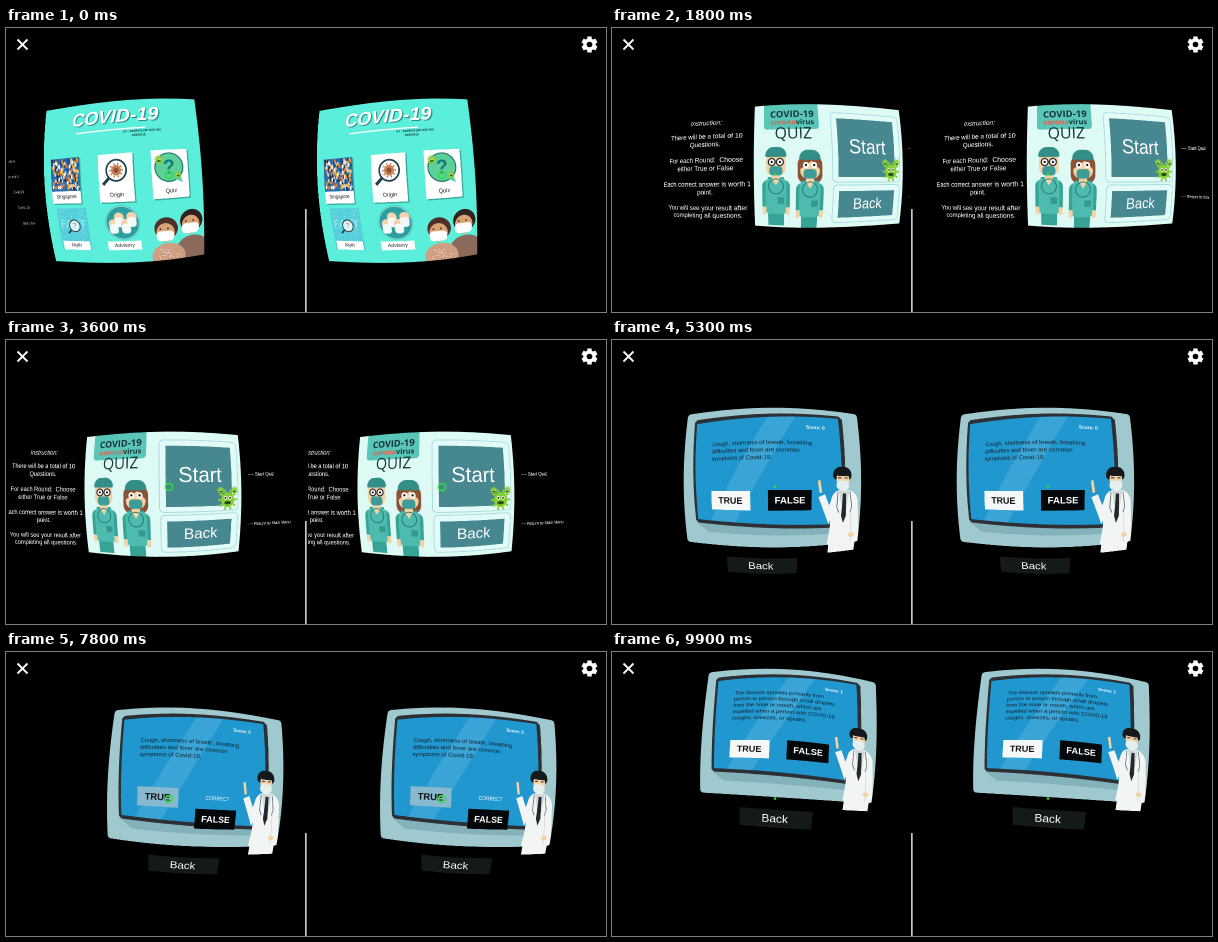
An HTML page with a canvas that plays this animation: 600x284 px, repeating every 10000 ms.

```html
<!DOCTYPE html>
<html lang="en">
<head>
<meta charset="utf-8">
<title>VR quiz</title>
<style>
html, body { margin: 0; width: 100%; height: 100%; overflow: hidden; background: #000; }
canvas { display: block; width: 600px; height: 284px; }
</style>
</head>
<body>
<canvas id="stage" width="600" height="284"></canvas>
<script>
const LOOP = 10000, STEP = 100;
const EYE = 273, CX = 163, CY = 147; // distance of the two views, gaze point
const FOCAL = 260, BARREL = 1.75e-5;
const TEX = 3, RES = 2, CELL = 10, LAP = .8;
const SANS = '"Liberation Sans", Arial, sans-serif';
const HUMAN = '"Open Sans", "Liberation Sans", sans-serif';
const INK = '#15353a', TEAL = '#4dbbae', SKIN = '#f3d2a6', GREEN = '#2ee23a';
const stage = document.getElementById('stage').getContext('2d');
const eye = newCanvas(330 * RES, 284 * RES);
let g; // context currently drawn on

function newCanvas(w, h) {
  const c = document.createElement('canvas');
  c.width = w;
  c.height = h;
  return c.getContext('2d');
}
let seed = 7;
const rand = n => (seed = seed * 16807 % 2147483647) / 2147483647 * n;

// Drawing helpers
function box(x, y, w, h, color, r = 0) {
  g.fillStyle = color;
  g.beginPath();
  g.roundRect(x, y, w, h, r);
  g.fill();
}
function oval(x, y, rx, ry, color) {
  g.fillStyle = color;
  g.beginPath();
  g.ellipse(x, y, rx, ry, 0, 0, 7);
  g.fill();
}
function dot(x, y, r, color) { oval(x, y, r, r, color); }
function ring(x, y, r, color, width) {
  g.strokeStyle = color;
  g.lineWidth = width;
  g.beginPath();
  g.arc(x, y, r, 0, 7);
  g.stroke();
}
function trace(points) {
  g.beginPath();
  for (let i = 0; i < points.length; i += 2) g.lineTo(points[i], points[i + 1]);
}
function poly(color, ...points) {
  trace(points);
  g.fillStyle = color;
  g.fill();
}
function line(color, width, ...points) {
  trace(points);
  g.strokeStyle = color;
  g.lineWidth = width;
  g.stroke();
}
function text(s, x, y, size, color = '#fff', align = 'center', style = '', family = SANS) {
  g.font = `${style} ${size}px ${family}`;
  g.textAlign = align;
  g.textBaseline = 'middle';
  g.fillStyle = color;
  g.fillText(s, x, y);
}
function placed(x, y, scale, draw) {
  g.save();
  g.translate(x, y);
  g.scale(scale, scale);
  draw();
  g.restore();
}
function virus(x, y, r, color) {
  for (let i = 0; i < 10; i++) {
    const a = i * Math.PI / 5, c = Math.cos(a) * r * 1.25, s = Math.sin(a) * r * 1.25;
    line(color, r * .16, x, y, x + c, y + s);
    dot(x + c, y + s, r * .17, color);
  }
  dot(x, y, r, color);
}
function germ(x, y, r) {
  virus(x, y, r, '#86cf32');
  for (const side of [-.35, .35]) {
    dot(x + side * r, y - r * .25, r * .25, '#fff');
    dot(x + side * r, y - r * .25, r * .13, '#222');
  }
  oval(x, y + r * .4, r * .5, r * .22, '#244d18');
}

// A flat picture, w by h, facing the viewer at some yaw; area may reach beyond it
function panel(w, h, area, draw, { yaw = 0, unit = 1 } = {}) {
  const [x0, y0, x1, y1] = area;
  g = newCanvas((x1 - x0) * TEX, (y1 - y0) * TEX);
  g.scale(TEX, TEX);
  g.translate(-x0, -y0);
  draw();
  return { w, h, area, yaw, unit, image: g.canvas };
}

function card(x, y, label) {
  box(x + 1.5, y + 1.5, 42, 55, '#35a99d');
  box(x, y, 42, 55, '#fff');
  text(label, x + 21, y + 47, 6.5, '#222');
}
function strip(x, y, w, label) {
  box(x - w / 2, y - 6, w, 12, '#fff');
  text(label, x, y, 6.5, '#222');
}
function lens(x, y, r, fill) {
  line('#23404d', r * .3, x, y, x - r * 1.4, y + r * 1.3);
  dot(x, y, r, fill);
  ring(x, y, r, '#23404d', r * .17);
}
function maskedHead(x, y, hair, coat) {
  oval(x + 1, y + 35, 21, 19, coat);
  dot(x, y - 3, 14, hair);
  oval(x - 1, y + 2, 11, 12, '#d9a377');
  box(x - 12, y, 21, 13, '#fff', 5);
  dot(x - 7, y - 3, 1, '#222');
  dot(x + 2, y - 3, 1, '#222');
}

const menu = panel(200, 200, [-110, 0, 200, 200], () => {
  box(0, 0, 200, 200, '#5beeda');
  text('COVID-19', 98.5, 23.5, 24, '#2f8f89', 'center', 'italic bold');
  text('COVID-19', 97, 22, 24, '#fff', 'center', 'italic bold');
  line('#fff', 1.6, 48, 38, 136, 38);
  text('BY : DARREN LIM SOO HUI', 132, 42, 3.4, '#163c3a', 'center', 'bold');
  text('P2930415', 128, 47, 3.6, '#163c3a', 'center', 'bold');

  card(11, 67, 'Singapore');
  box(11, 67, 42, 40, '#2c6fae');
  const crowd = ['#f2b233', '#fff', '#164b86', '#e8793a', '#f3c9a5', '#222f45'];
  for (let i = 0; i < 170; i++) {
    oval(13 + rand(38), 69 + rand(36), 1.3, 2.4, crowd[i % crowd.length]);
  }
  card(78, 67, 'Origin');
  lens(100, 86, 12, '#fff');
  virus(100, 86, 6, '#c98254');
  dot(100, 86, 3, '#8f4c36');
  card(141, 66, 'Quiz');
  dot(161, 86, 16, '#5ccf9b');
  ring(161, 86, 16, '#247c70', 1.4);
  poly('#5ccf9b', 166, 99, 176, 104, 173, 94);
  text('?', 161, 87, 22, '#147d78', 'center', 'bold');
  germ(150, 77, 4);
  germ(171, 95, 3);

  box(16, 128, 42, 54, '#56cfdb');
  for (let i = 0; i < 70; i++) dot(18 + rand(38), 130 + rand(36), .6, '#a4eef2');
  text('FACT', 37, 148, 14, '#8be8ee', 'center', 'bold');
  lens(39, 150, 7.5, '#d8f6f8');
  text('?', 39, 150, 9, '#d9674f');
  strip(37, 176, 38, 'Myth');

  dot(102, 147, 21, '#2b9f9f');
  ring(102, 147, 20, '#86dfd6', 1.2);
  for (let i = 0; i < 4; i++) {
    const x = 91 + i * 7.5, y = 148 - i % 2 * 8;
    dot(x, y, 6, '#f4d2ae');
    box(x - 5.5, y, 11, 12, '#f2faf8', 4);
  }
  strip(101, 176, 42, 'Advisory');

  maskedHead(184, 153, '#30231f', '#8b6a5c');
  maskedHead(153, 160, '#4d3029', '#cf9f83');
  for (let i = 0; i < 24; i++) dot(140 + rand(28), 183 + rand(17), .6, '#fff');

  ['Origin story', 'Coronavirus', 'Covid 19', 'Covid 19', 'about this']
    .forEach((s, i) => text(s, -50 + i * 7, 64 + i * 21, 5.2, '#bbb', 'right'));
}, { unit: .915 });

function medic(woman) {
  if (woman) box(-15, -11, 30, 33, '#8a5235', 10);
  box(-10, 18, 20, 60, '#36a396');
  box(-17, 21, 34, 40, '#36a396', 8);
  box(-13, 20, 26, 43, TEAL, 5);
  box(-17, 54, 5, 10, SKIN, 2);
  box(12, 54, 5, 10, SKIN, 2);
  poly(SKIN, -5, 14, 5, 14, 5, 20, 0, 28, -5, 20);
  ring(0, 29, 9, '#226d6a', 1);
  box(2, 42, 8, 8, '#35998e');
  box(-12, -11, 24, 27, SKIN, 9);
  if (woman) poly('#8a5235', -12, -8, 12, -8, 12, 5, 2, -5, -12, 5);
  box(-13, -18, 26, 12, '#318f88', [11, 11, 2, 2]);
  for (const side of [-5, 5]) {
    dot(side, 0, 3.6, '#fff');
    dot(side, 0, 1.4, '#222');
    if (!woman) ring(side, 0, 4.2, '#222', 1.4);
  }
  box(-8, 5, 16, 11, '#3b9c98', 4);
}
function button(x, y, w, h, label, size) {
  box(x, y, w, h, '#a9dce0', 5);
  box(x + 1, y + 1, w - 2, h - 2, '#e2faf8', 4);
  box(x + 7, y + 7, w - 15, h - 13, '#478790');
  text(label, x + w / 2, y + h / 2 + 1, size);
}

const quiz = panel(174, 134, [0, 0, 174, 134], () => {
  box(0, 0, 174, 134, '#defaf5');
  box(11, -6, 60, 35, '#5ac6b8', 4);
  text('COVID-19', 42, 12.5, 10.5, INK, 'center', 'bold', HUMAN);
  text('corona', 46, 21.5, 8, '#e25f4c', 'right', 'bold', HUMAN);
  text('virus', 46, 21.5, 8, INK, 'left', 'bold', HUMAN);
  text('QUIZ', 43, 35, 17, INK, 'center', '', HUMAN);
  placed(24, 64, .87, () => medic(false));
  placed(60, 67, .87, () => medic(true));
  button(84, 9, 86, 76, 'Start', 22);
  button(85, 87, 85, 42, 'Back', 16.5);
  germ(157, 73, 8);
  germ(149, 63, 3.2);
  germ(165, 63, 3.4);
});

const labels = panel(60, 80, [0, 0, 70, 80], () => {
  text('---- Start Quiz', 4, 20, 5.4, '#fff', 'left');
  text('---- Return to Main Menu', 4, 73, 5, '#fff', 'left');
}, { yaw: 26 });

const guide = panel(104, 104, [0, 0, 110, 120], () => {
  text('Instruction:', 52, 6, 7.5, '#fff', 'center', 'italic');
  const notes = [['There will be a total of 10', 'Questions.'],
    ['For each Round:  Choose', 'either True or False'],
    ['Each correct answer is worth 1', 'point.'],
    ['You will see your result after', 'completing all questions.']];
  notes.forEach((rows, i) => rows.forEach((s, j) => text(s, 52, 21 + i * 25.3 + j * 8.5, 7.5)));
}, { yaw: -30.3 });

// Origin between the eyes
function doctor() {
  const coat = '#f3f5f4', hair = '#15191c';
  line(coat, 8, -8, 20, -16, 40, -25, 19);
  line(SKIN, 3, -26, 16, -28, 3);
  box(-14, 13, 34, 72, coat, [12, 15, 0, 0]);
  poly(coat, -12, 35, 20, 30, 25, 74, -16, 74);
  poly('#cfd9d9', -5, 14, 8, 14, 3, 48);
  poly('#22282c', 0, 17, 4, 17, 5, 42, 2, 50, -1, 42);
  line('#5d6b70', 1, -6, 15, -7, 32, -4, 38);
  line('#5d6b70', 1, 9, 15, 12, 32, 10, 38);
  line('#c7cfcf', .8, 11, 36, 14, 74);
  oval(14, 65, 4, 3, SKIN);
  box(-12, -12, 23, 14, hair, [10, 9, 5, 5]);
  oval(0, 2, 8, 10, SKIN);
  box(-8, -8, 17, 6, hair, 3);
  box(-8, 3, 16, 10, '#e4efef', 5);
  line(hair, 1, -6, 0, -2, 0);
  line(hair, 1, 2, 0, 6, 0);
}

function question(rows, score, answered) {
  return panel(202, 152, [0, 0, 202, 190], () => {
    const drop = answered ? 21 : 0;
    box(0, 0, 202, 152, '#9fc9cf', 4);
    poly('#83b2ba', 15, 126, 180, 131, 190, 139, 30, 137);
    poly('#2c2f34', 11, 12, 14, 9, 177, 6, 181, 10, 181, 130, 178, 132, 18, 127, 15, 124);
    poly('#2097cf', 14, 14, 176, 9, 177, 128, 18, 123);
    poly('#3aa4d6', 96, 11.5, 126, 10.5, 62, 124.3, 34, 123.5);
    text(`Score: ${score}`, 148, 23, 5.4, '#fff', 'center', 'bold');
    rows.forEach((s, i) => text(s, 36, 49 + (i - (rows.length - 1) / 2) * 8, 6.4, '#12222d', 'left'));
    box(36, 91, 43, 20, answered ? '#88b9cf' : '#f6f8f8');
    text('TRUE', 57.5, 101.5, 9.8, '#111', 'center', 'bold');
    box(97, 90 + drop, 45, 21, '#05080a');
    text('FALSE', 119.5, 101 + drop, 9.8, '#fff', 'center', 'bold');
    if (answered) text('CORRECT', 120, 100, 5.3);
    placed(178, 77, 1, doctor);
    box(49, 166, 80, 21, '#14191a');
    text('Back', 88, 177, 13);
  });
}
const cough = ['Cough, shortness of breath, breathing', 'difficulties and fever are common',
  'symptoms of Covid-19.'];
const spread = ['The disease spreads primarily from', 'person to person through small droplets',
  'from the nose or mouth, which are', 'expelled when a person with COVID-19',
  'coughs, sneezes, or speaks.'];

// Panels in view until the given time
const scenes = [
  [500, [menu]],
  [4100, [quiz, guide, labels]],
  [7400, [question(cough, 0, false)]],
  [8900, [question(cough, 0, true)]],
  [LOOP, [question(spread, 1, false)]],
];

// Time, then where straight ahead lies: yaw, pitch, roll in degrees
const track = [
  [500, -12, 1, -3.7],
  [500, .9, -4.2, -2.6], [1000, .9, -4.2, -2.6],
  [2000, 15.3, -2, 0], [2700, 15.3, -2, 0],
  [3600, -1.6, 1.8, -.6], [4100, -1.6, 1.8, -.6],
  [4100, -6.5, -.2, 0], [4500, -6.5, -.2, 0],
  [5200, -.7, -2.4, 0], [5300, -.7, -2.4, 0],
  [6400, 6.9, -5.8, 2.5], [8900, 6.9, -5.8, 2.5],
  [9900, 3, -16.7, 2.8],
];
function headAt(t) {
  const i = track.findIndex(k => k[0] > t);
  if (i < 1) return track.at(i).slice(1);
  const a = track[i - 1], b = track[i];
  const p = (t - a[0]) / (b[0] - a[0]), e = p * p * (3 - 2 * p);
  return [1, 2, 3].map(j => a[j] + (b[j] - a[j]) * e);
}

function turn(a, b, degrees) {
  const r = degrees * Math.PI / 180, c = Math.cos(r), s = Math.sin(r);
  return [a * c - b * s, a * s + b * c];
}
// Lens distortion: solves d + BARREL d^3 = r
function bulge(x, y) {
  const r = Math.hypot(x, y) || 1e-6;
  let d = r;
  for (let i = 0; i < 6; i++) d -= (d + BARREL * d ** 3 - r) / (1 + 3 * BARREL * d * d);
  return [CX + x * d / r, CY + y * d / r];
}
function project(p, [yaw, pitch, roll]) {
  const at = (px, py) => {
    let x = (px - p.w / 2) * p.unit, y = (py - p.h / 2) * p.unit, z = FOCAL;
    [z, x] = turn(z, x, yaw + p.yaw);
    [z, y] = turn(z, y, pitch);
    [x, y] = turn(x, y, roll);
    return bulge(x * FOCAL / z, y * FOCAL / z);
  };
  const [x0, y0, x1, y1] = p.area, k = RES / CELL;
  for (let y = y0; y < y1; y += CELL) {
    for (let x = x0; x < x1; x += CELL) {
      const a = at(x, y), b = at(x + CELL, y), c = at(x, y + CELL);
      const w = Math.min(CELL + LAP, x1 - x), h = Math.min(CELL + LAP, y1 - y);
      eye.setTransform((b[0] - a[0]) * k, (b[1] - a[1]) * k, (c[0] - a[0]) * k, (c[1] - a[1]) * k,
        a[0] * RES, a[1] * RES);
      eye.drawImage(p.image, (x - x0) * TEX, (y - y0) * TEX, w * TEX, h * TEX, 0, 0, w, h);
    }
  }
}

function drawEye(t) {
  const head = headAt(t);
  eye.setTransform(1, 0, 0, 1, 0, 0);
  eye.clearRect(0, 0, 330 * RES, 284 * RES);
  for (const p of scenes.find(s => t < s[0])[1]) project(p, head);
  eye.setTransform(RES, 0, 0, RES, 0, 0);
  g = eye;
  const hover = t < 1300 || t > 3200 && t < 4100 || t > 6200 && t < 8900;
  if (hover) ring(CX, CY, 3.6, GREEN, 1.4);
  else dot(CX, CY - .5, 1.3, GREEN);
}

function showEye(left, width, dx) {
  g.save();
  g.beginPath();
  g.rect(left, 0, width, 284);
  g.clip();
  g.drawImage(eye.canvas, dx, 0, 330, 284);
  g.restore();
}

function drawControls() {
  box(299, 181, 1.7, 103, '#c8c8c8');
  line('#fff', 1.8, 11.5, 11.5, 21.5, 21.5);
  line('#fff', 1.8, 21.5, 11.5, 11.5, 21.5);
  for (let i = 0; i < 3; i++) {
    const [c, s] = turn(8, 0, 30 + i * 60);
    line('#fff', 4.4, 583.5 - c, 16.5 - s, 583.5 + c, 16.5 + s);
  }
  dot(583.5, 16.5, 6.2, '#fff');
  dot(583.5, 16.5, 2.8, '#000');
}

let shown = -1;
const start = performance.now();
function frame() {
  const t = Math.floor((performance.now() - start) % LOOP / STEP) * STEP;
  if (t !== shown) {
    shown = t;
    drawEye(t);
    g = stage;
    box(0, 0, 600, 284, '#000');
    showEye(2, 296, 0);
    showEye(302, 295, EYE);
    drawControls();
  }
  requestAnimationFrame(frame);
}
frame();
</script>
</body>
</html>
```
